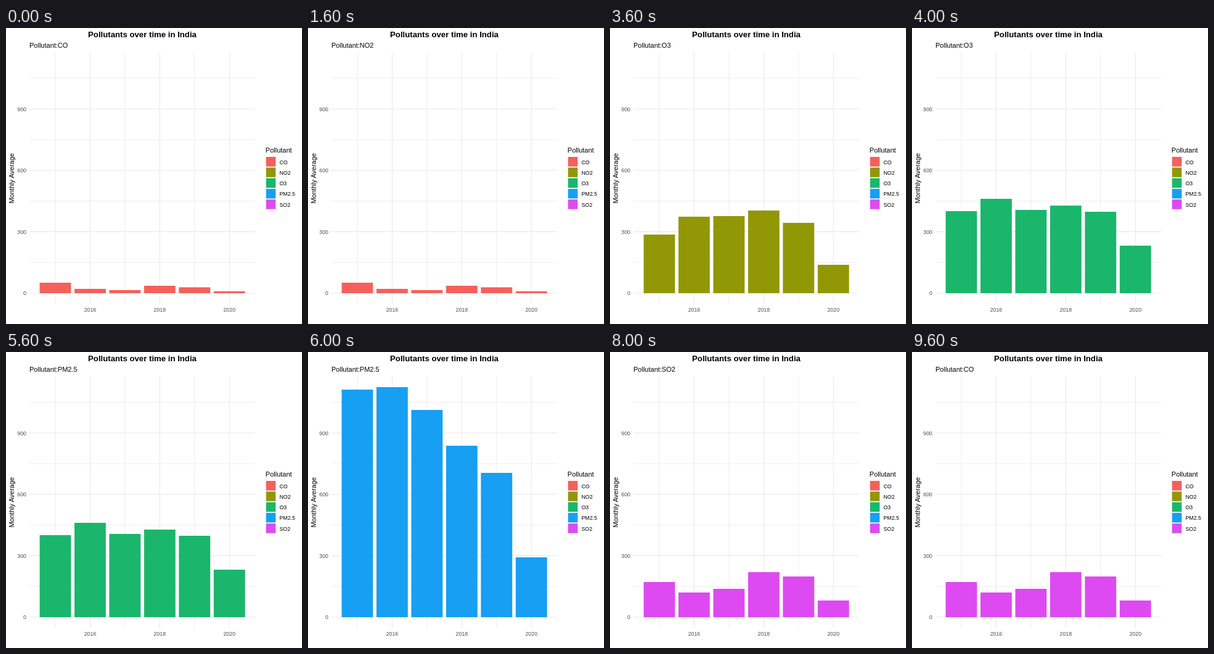
An HTML page for the animation above (10000 ms loop, 480 by 480 pixels).

```html
<!DOCTYPE html>
<html lang="en">
<head>
<meta charset="utf-8">
<title>Pollutants over time</title>
<style>
  html, body { margin: 0; width: 100%; height: 100%; overflow: hidden; background: #fff; }
  svg { display: block; width: 480px; height: 480px; }
  text { font: 11px "Liberation Sans", Arial, sans-serif; fill: #000; }
  .title { font-size: 13.2px; font-weight: bold; text-anchor: middle; }
  .tick { font-size: 8.8px; fill: #4d4d4d; text-anchor: middle; }
  .left { text-anchor: end; }
  .key { font-size: 8.8px; }
  .major { stroke: #e8e8e8; stroke-width: 1.07; }
  .minor { stroke: #ebebeb; stroke-width: .9; }
  .state { visibility: hidden; animation: turn 10s step-end infinite; }
  @keyframes turn {
    0% { visibility: visible; }
    20%, 100% { visibility: hidden; }
  }
</style>
</head>
<body>
<svg id="chart" viewBox="0 0 480 480">
  <text class="title" x="221" y="15">Pollutants over time in India</text>
  <text transform="translate(13 243.7) rotate(-90)" text-anchor="middle">Monthly Average</text>
  <text x="420.8" y="202">Pollutant</text>
</svg>
<script>
const series = [
  { name: "CO",    color: "#f5605b", tops: [413, 423, 425, 418, 420.5, 427] },
  { name: "NO2",   color: "#929706", tops: [335, 306, 305, 296, 316, 384] },
  { name: "O3",    color: "#1ab66b", tops: [297, 277, 295, 288, 298, 353] },
  { name: "PM2.5", color: "#169ff3", tops: [61, 57, 94, 152, 196, 333] },
  { name: "SO2",   color: "#de4af1", tops: [373, 390, 384, 357, 364, 403] }
];
const chart = document.getElementById("chart");
const base = 430, barWidth = 50.8;
const yearX = i => 80 + i * 56.45;
const valueY = v => base - v * 0.332;

function add(parent, tag, attrs, text) {
  const el = document.createElementNS("http://www.w3.org/2000/svg", tag);
  for (const k in attrs) el.setAttribute(k, attrs[k]);
  if (text !== undefined) el.textContent = text;
  return parent.appendChild(el);
}

const startAt = s => `animation-delay:${s - 10}s`;

for (const type of ["minor", "major"]) {
  const odd = type === "major" ? 1 : 0;
  for (let v = odd ? 0 : 150; v < 1100; v += 300) {
    const y = valueY(v);
    add(chart, "line", { class: type, x1: 38, x2: 404, y1: y, y2: y });
    if (odd) add(chart, "text", { class: "tick left", x: 33, y: y + 3.4 }, v);
  }
  for (let i = odd; i < 6; i += 2) {
    const x = yearX(i);
    add(chart, "line", { class: type, x1: x, x2: x, y1: 39, y2: 448 });
    if (odd) add(chart, "text", { class: "tick", x, y: 460 }, 2015 + i);
  }
}

series.forEach(({ name, color, tops }, i) => {
  const bars = add(chart, "g", { class: "state", fill: color, style: startAt(2 * i) });
  tops.forEach((y, j) => add(bars, "rect", {
    x: yearX(j) - barWidth / 2, y, width: barWidth, height: base - y
  }));

  // The subtitle switches 0.4 s ahead of its bars.
  add(chart, "text", { class: "state", x: 38, y: 32, style: startAt(2 * i - 0.4) }, "Pollutant:" + name);

  const y = 209 + i * 17.28;
  add(chart, "rect", { x: 421.7, y, width: 15.6, height: 15.6, fill: color });
  add(chart, "text", { class: "key", x: 443.5, y: y + 11.6 }, name);
});
</script>
</body>
</html>
```
